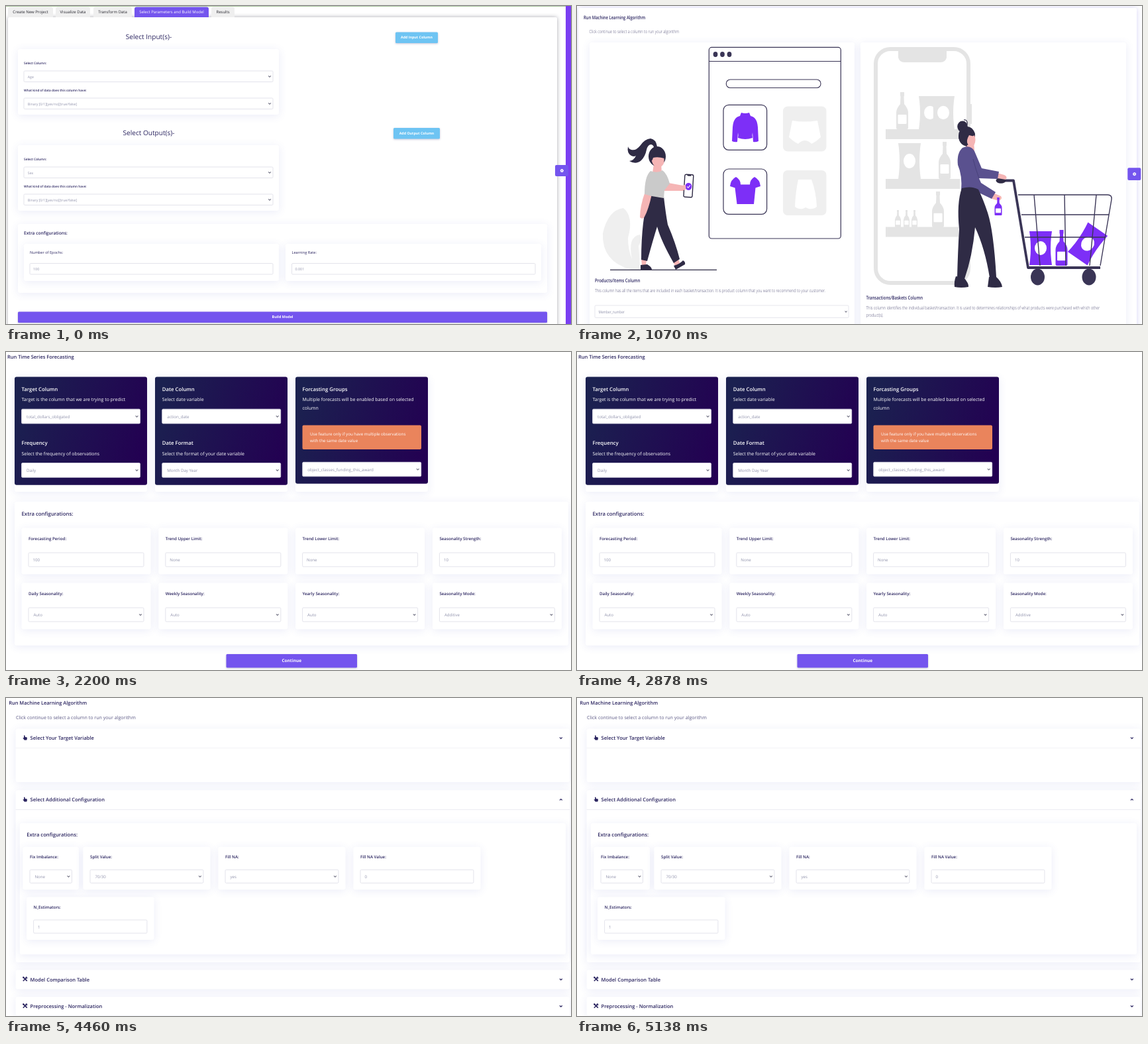
These frames come from a looping animation (853x480 px, 5.59 s). An HTML page with a canvas:

```html
<!DOCTYPE html>
<html lang="en">
<head>
<meta charset="utf-8">
<title>Model builder screens</title>
<style>
html, body { margin: 0; width: 100%; height: 100%; overflow: hidden; background: #fff; }
canvas { display: block; width: 853px; height: 480px; }
</style>
</head>
<body>
<canvas id="stage"></canvas>
<script>
const W = 853, H = 480;
const canvas = document.getElementById('stage');
const ctx = canvas.getContext('2d');
const ratio = window.devicePixelRatio || 1;
canvas.width = Math.round(W * ratio);
canvas.height = Math.round(H * ratio);

const PURPLE = '#7455ee', NAVY = '#2b2560', INK = '#2f2b45', LINE = '#3a3556';
const VIOLET = '#7d2ff7', SKIN = '#f5b5b5', PALE = '#e4e4e4', FIELD = '#9092ab';

function box(x, y, w, h, r, fill, stroke, lw = 1) {
  ctx.beginPath();
  ctx.roundRect(x, y, w, h, r);
  if (fill) { ctx.fillStyle = fill; ctx.fill(); }
  if (stroke) { ctx.strokeStyle = stroke; ctx.lineWidth = lw; ctx.stroke(); }
}

function shadow(color, blur, dy, draw) {
  ctx.save();
  ctx.shadowColor = color;
  ctx.shadowBlur = blur * ratio;
  ctx.shadowOffsetY = dy * ratio;
  draw();
  ctx.restore();
}

function card(x, y, x2, y2) {
  shadow('rgba(70,80,190,.11)', 13, 2, () => box(x, y, x2 - x, y2 - y, 3, '#fff'));
}

// y is the middle of the capital letters
function text(s, x, y, size, { weight = 400, color = NAVY, align = 'left' } = {}) {
  ctx.font = `${weight} ${size}px "Open Sans", "Noto Sans", sans-serif`;
  ctx.fillStyle = color;
  ctx.textAlign = align;
  ctx.fillText(s, x, y + size * 0.357);
}

const bold = (s, x, y, size, color = NAVY) => text(s, x, y, size, { weight: 600, color });

function chevron(x, y, dir = 1, size = 1.9, color = NAVY) {
  ctx.beginPath();
  ctx.moveTo(x - size, y - dir * size / 2);
  ctx.lineTo(x, y + dir * size / 2);
  ctx.lineTo(x + size, y - dir * size / 2);
  ctx.strokeStyle = color;
  ctx.lineWidth = 1.2;
  ctx.stroke();
}

function input(x, y, x2, y2, value, size = 6.1, pad = 6.5) {
  box(x, y, x2 - x, y2 - y, 1.5, '#fff', '#dcdce6', 0.8);
  text(value, x + pad, (y + y2) / 2 + 0.4, size, { color: FIELD });
}

function select(x, y, x2, y2, value, size, pad = 7.5) {
  input(x, y, x2, y2, value, size, pad);
  chevron(x2 - 5, (y + y2) / 2, 1, 1.9, '#777788');
}

function button(x, y, x2, y2, label, color, size) {
  shadow('rgba(60,60,120,.3)', 3, 1, () => box(x, y, x2 - x, y2 - y, 1.5, color));
  text(label, (x + x2) / 2, (y + y2) / 2 - 0.2, size, { weight: 700, color: '#fff', align: 'center' });
}

function shape(d, fill) {
  ctx.fillStyle = fill;
  ctx.fill(new Path2D(d));
}

function stroke(d, color, lw) {
  ctx.strokeStyle = color;
  ctx.lineWidth = lw;
  ctx.stroke(new Path2D(d));
}

function oval(x, y, rx, ry, fill) {
  ctx.beginPath();
  ctx.ellipse(x, y, rx, ry, 0, 0, Math.PI * 2);
  ctx.fillStyle = fill;
  ctx.fill();
}

function gearButton(x, y, h) {
  box(x, y, 20, h, 2, PURPLE);
  const cx = x + 10.3, cy = y + h / 2;
  for (let i = 0; i < 8; i++) {
    const a = i * Math.PI / 4;
    oval(cx + 2 * Math.cos(a), cy + 2 * Math.sin(a), 0.7, 0.7, '#fff');
  }
  oval(cx, cy, 2, 2, '#fff');
  oval(cx, cy, 0.8, 0.8, PURPLE);
}

function columnForm(y, value) {
  card(18, y, 412, y + 99);
  bold('Select Column:', 27, y + 21.5, 4.8);
  select(27, y + 33, 403, y + 49.5, value, 5.2, 5.8);
  bold('What kind of data does this column have:', 27, y + 62, 4.75);
  select(27, y + 74, 403, y + 90.5, 'Binary [0/1][yes/no][true/false]', 5.2, 5.8);
}

function parameters() {
  shadow('rgba(40,40,60,.4)', 6, 0, () => box(3, 17, 829, 480, 2, '#fff'));
  box(0, 0, W, 1, 0, '#a9c59c');
  const tabs = [
    [3, 71, 'Create New Project'], [75, 127, 'Visualize Data'], [132, 190, 'Transform Data'],
    [194, 306, 'Select Parameters and Build Model'], [310, 345, 'Results']
  ];
  tabs.forEach(([x, x2, label], i) => {
    const on = i === 3;
    box(x, 1.5, x2 - x, 15.5, [3, 3, 0, 0], on ? PURPLE : '#efefef');
    text(label, (x + x2) / 2, 9.3, 6, { color: on ? '#fff' : '#25252d', align: 'center' });
  });
  box(845, 0, 8, H, 0, '#7a3ff2');

  const title = { weight: 500, align: 'center' };
  text('Select Input(s)-', 215.5, 46, 10.1, title);
  text('Select Output(s)-', 215.5, 191, 10.1, title);
  button(588, 39.5, 652, 56, 'Add Input Column', '#6ec4f3', 5.3);
  button(585, 184, 655, 200.5, 'Add Output Column', '#6ec4f3', 5.3);
  columnForm(65, 'Age');
  columnForm(210, 'Sex');

  card(18, 329, 817, 433);
  bold('Extra configurations:', 27, 342.5, 6.6);
  card(27, 359, 412, 415);
  card(422, 359, 808, 415);
  text('Number of Epochs:', 36, 372.5, 5.6, { weight: 500 });
  text('Learning Rate:', 431.5, 372.5, 5.6, { weight: 500 });
  input(36, 388.5, 403, 405, '100', 5.4, 5);
  input(431.5, 388.5, 799, 405, '0.001', 5.4, 5);
  button(18, 461.5, 817, 478, 'Build Model', PURPLE, 5.4);
  gearButton(829, 240, 17);
}

function bottle(x, y, w, h, fill) {
  ctx.save();
  ctx.translate(x, y);
  ctx.scale(w / 18, h / 56);
  shape('M6 0H12V5L11.5 7L12 18Q18 25 18 31V54Q18 56 16 56H2Q0 56 0 54V31Q0 25 6 18L6.5 7L6 5Z', fill);
  box(2.5, 34, 13, 14, 1, '#fff');
  ctx.restore();
}

function bag(x, y, w, h, fill) {
  ctx.save();
  ctx.translate(x, y);
  ctx.scale(w / 34, h / 54);
  shape('M0 0H34L33 8Q31 27 33 46L34 54H0L1 46Q3 27 1 8Z', fill);
  oval(17, 27, 9, 11, '#fff');
  ctx.restore();
}

function browserWindow() {
  box(199.3, 62.4, 199, 288.6, 4, '#fff', LINE, 1.2);
  stroke('M199 83.5H398', LINE, 1.1);
  [209, 219.5, 230].forEach(x => oval(x, 73, 3.4, 4, LINE));
  box(225.3, 111, 142.7, 12.5, 6, null, LINE, 1.1);
  box(221, 149.3, 65.6, 68, 8, null, LINE, 1.2);
  box(221, 246, 65.6, 68.3, 8, null, LINE, 1.2);
  box(311, 151.5, 65.5, 68, 7, '#efefef');
  box(311, 248, 65.5, 68, 7, '#efefef');
  shape('M248 161Q254 163 260 161L262 166Q272 168 273 183L274 204Q270 206 266 205L265 191Q264 195 265 199Q254 203 243 199Q244 195 243 191L242 205Q238 206 234 204L235 183Q236 168 246 166Z', VIOLET);
  shape('M240 258Q247 262 247 269.5H261Q261 262 268 258Q276 262 277 272L269.5 274.5L267 299H241.500L238.500 274.500L231 272Q232 262 240 258Z', VIOLET);
  shape('M325 173Q344 176 363 173L368 198Q361 205 354 208Q349 203 344 203Q339 203 334 208Q327 205 320 198Z', '#fff');
  shape('M334 262H354Q361 280 362 303Q357 307 350 306L345 304L341 306Q334 307 329 303Q330 280 334 262Z', '#fff');
}

function shopper() {
  shape('M82 398Q37 386 39 343Q47 308 70 305Q86 318 77 350Q77 368 83 382Q76 348 95 345Q99 352 93 362Q94 373 95 398Z', '#efefef');
  stroke('M50 398.3H211', INK, 1.2);
  shape('M121 212Q119 201 111 200Q102 201 96 210Q89 219 82 217Q78 216 77 212Q75 222 82 226Q86 228 89 226Q86 233 79 234Q89 240 97 233Q103 227 105 217Q107 209 112 209Q116 210 116 214Z', INK);
  shape('M116 238H127L128 252H114Z', SKIN);
  oval(121, 227, 13, 15, INK);
  shape('M112 228H131Q134 242 122 244Q113 242 112 228Z', SKIN);
  shape('M110 233Q107 214 121 213Q135 215 132 230Q122 227 115 229Q113 236 110 233Z', INK);
  shape('M132 266L160 271L169 267L171 270L163 279L132 279Z', SKIN);
  shape('M97 380H105L104 393H98ZM145 386L153 382L156 390L149 394Z', SKIN);
  shape('M109 283Q121 290 131 288Q134 314 137 330Q149 358 155 382L146 388Q127 355 121 333Q115 352 106 385L97 383Q97 322 109 283Z', INK);
  shape('M103 280L113 284Q108 307 102 318Q99 323 95 319Q95 302 103 280Z', SKIN);
  shape('M111 249Q122 253 129 248Q136 253 140 268L132 278L131 290L113 287L102 284Q102 257 111 249Z', '#cacaca');
  shape('M96 391L106 390Q113 394 113 398H96ZM146 392Q156 389 160 384Q164 386 163 390L149 398Z', INK);
  ctx.save();
  ctx.translate(168.4, 271.5);
  ctx.rotate(0.06);
  box(-6.5, -17, 13, 34, 2, '#fff', INK, 1.4);
  box(-3, -17, 6, 2, 1, INK);
  oval(0, 1, 5, 5.6, VIOLET);
  stroke('M-2 1L-.5 3L2.5 -1', '#fff', 1);
  ctx.restore();
  oval(162, 274, 2.4, 4, SKIN);
}

function bigPhone() {
  box(451, 65, 140, 353, 22, '#fff', PALE, 6);
  shape('M485 65H558V78Q556 85 549 85H494Q487 85 485 78Z', PALE);
  box(594, 148, 2, 30, 0, PALE);
  [[186, 112], [261, 112], [333.5, 110]].forEach(([y, w]) => box(466, y, w, 15, 0, PALE));
  bottle(482, 130, 18, 56, PALE);
  bag(516, 136, 34, 50, PALE);
  bag(536, 136, 34, 50, PALE);
  bag(485, 207, 34, 54, PALE);
  bottle(546, 205, 18, 56, PALE);
  [480, 493, 505].forEach(x => bottle(x, 308, 9, 26, PALE));
  bottle(536, 280, 18, 54, PALE);
}

function cart() {
  bag(683, 340, 34, 51, VIOLET);
  bottle(722.5, 338, 18, 54, VIOLET);
  ctx.save();
  ctx.translate(771, 359);
  ctx.rotate(0.6);
  bag(-18, -27, 36, 54, VIOLET);
  ctx.restore();
  stroke('M666 285H801Q808 285 807 292L790 392M690 285L699 392M736 285L738 392M784 285L774 392M671 315H803M676 349H797', LINE, 1.4);
  ctx.lineJoin = 'round';
  stroke('M640 263.5H659L681 395H790', LINE, 3.8);
  ctx.lineJoin = 'miter';
  oval(640, 263.5, 7.5, 4.2, INK);
  stroke('M695 395V407M773 395V407', LINE, 3);
  oval(695.5, 409, 10.5, 12.5, LINE);
  oval(773, 409, 10.5, 12.5, LINE);
}

function cartShopper() {
  shape('M634 252L645 255Q651 258 647 262L635 260ZM628 282L640 287Q643 291 637 294L626 291Z', SKIN);
  shape('M588 204H599L600 219H586Z', SKIN);
  oval(582, 182, 7.8, 8.5, INK);
  stroke('M584 172Q590 171 589 179', INK, 1.2);
  oval(588.5, 196, 12.5, 14, INK);
  oval(595, 202, 6.5, 10.5, SKIN);
  shape('M585 187Q594 179 601 193Q600 198 592 195Q587 203 589 212Q577 210 576 197Z', INK);
  shape('M582 214Q594 209 600 219Q606 233 611 245L637 250L635 261L607 260L610 267L632 281L626 291L605 281Q594 278 580 279Q582 256 575 240Q573 222 582 214Z', '#5a518f');
  stroke('M598 231Q602 247 607 260', '#453e75', 0.8);
  shape('M581 275Q596 271 606 277Q613 291 620 312Q629 340 633 409L623 410Q616 366 601 334Q597 378 585 412L574 410Q575 370 577 337Q573 297 581 275Z', INK);
  shape('M572 408L584 410Q592 419 591 424Q580 426 570 424Q569 416 572 408ZM622 409L632 408Q641 416 642 424Q632 426 620 424Z', INK);
  bottle(630.5, 289, 11, 27, VIOLET);
}

function basket() {
  shadow('rgba(90,80,220,.25)', 8, 0, () => box(2, 3, 843, 490, 2, '#fff'));
  card(19, 55, 419, 520);
  card(428, 55, 829, 520);
  browserWindow();
  shopper();
  bigPhone();
  cart();
  cartShopper();

  // this screen is narrower than the others
  const k = 0.79, light = { weight: 300, color: '#4a4770' };
  ctx.save();
  ctx.scale(k, 1);
  bold('Run Machine Learning Algorithm', 10 / k, 17, 7.45);
  text('Click continue to select a column to run your algorithm', 18.5 / k, 39, 7, light);
  bold('Products/Items Column', 27 / k, 414, 7.6);
  text('This column has all the items that are included in each basket/transaction. It is product column that you want to recommend to your customer.', 27 / k, 429.5, 6.92, light);
  bold('Transactions/Baskets Column', 436.5 / k, 440.5, 7.6);
  text('This column identifies the individual basket/transaction. It is used to determines relationships of what products were purchased with which other', 436.5 / k, 455.5, 6.92, light);
  text('product(s).', 436.5 / k, 466.5, 6.92, light);
  select(27 / k, 452, 410 / k, 470.5, 'Member_number', 6.1, 7);
  ctx.restore();
  gearButton(831.3, 244.3, 18.7);
}

function darkCard(x, h) {
  card(x, 37.4, x + 200, 211);
  const g = ctx.createLinearGradient(x, 90, x + 200, 150);
  g.addColorStop(0, '#1b2150');
  g.addColorStop(1, '#230052');
  box(x, 37.4, 200, h, 3, g);
}

function darkField(x, y, title, note, value) {
  bold(title, x, y, 7.8, '#fff');
  text(note, x, y + 16, 6.95, { color: '#fff' });
  select(x, y + 30.2, x + 179, y + 52, value, 6.2);
}

function forecasting() {
  bold('Run Time Series Forecasting', 2, 7.7, 7.45);
  darkCard(13, 163.4);
  darkCard(225, 163.4);
  darkCard(437, 161.4);
  darkField(23.5, 56, 'Target Column', 'Target is the column that we are trying to predict', 'total_dollars_obligated');
  darkField(23.5, 137.3, 'Frequency', 'Select the frequency of observations', 'Daily');
  darkField(235.7, 56, 'Date Column', 'Select date variable', 'action_date');
  darkField(235.7, 137.3, 'Date Format', 'Select the format of your date variable', 'Month Day Year');
  const white = { color: '#fff' };
  bold('Forcasting Groups', 447.5, 56, 7.8, '#fff');
  text('Multiple forecasts will be enabled based on selected', 447.5, 72, 6.95, white);
  text('column', 447.5, 85, 6.95, white);
  box(447.5, 110.5, 179.5, 36.5, 2, '#ea845c');
  text('Use feature only if you have multiple observations', 459, 124, 6.2, white);
  text('with the same date value', 459, 134, 6.2, white);
  select(447.7, 166.3, 626.7, 187.8, 'object_classes_funding_this_award', 6.2);

  card(13, 226, 849, 443);
  bold('Extra configurations:', 23.5, 244, 7.8);
  const fields = [
    ['Forecasting Period:', '100'], ['Trend Upper Limit:', 'None'],
    ['Trend Lower Limit:', 'None'], ['Seasonality Strength:', '10'],
    ['Daily Seasonality:', 'Auto'], ['Weekly Seasonality:', 'Auto'],
    ['Yearly Seasonality:', 'Auto'], ['Seasonality Mode:', 'Additive']
  ];
  fields.forEach(([label, value], i) => {
    const x = 23.5 + (i % 4) * 206.8, y = i < 4 ? 265.5 : 348.5;
    card(x, y, x + 195, y + 70);
    bold(label, x + 10.5, y + 16.5, 6.2);
    (i < 4 ? input : select)(x + 10.5, y + 37.5, x + 184.5, y + 58.5, value);
  });
  button(332.5, 456, 530, 476.5, 'Continue', PURPLE, 6.5);
}

function icon(kind, x, y) {
  ctx.save();
  ctx.translate(x, y);
  if (kind === 'hand') {
    box(-1.8, -3.6, 1.6, 5, 0.8, NAVY);
    shape('M-3 -.2L-1.8 .4V-1H0L3 -.4V2L2.4 3.6H-1.2L-3.2 .6Z', NAVY);
  } else {
    stroke('M-2.6 -2.6L3 3', NAVY, 1.7);
    stroke('M2.2 -2.2L-3 3', NAVY, 1.5);
    oval(-2.5, -2.5, 1.2, 1.2, NAVY);
    oval(2.2, -2.2, 1.6, 1.6, NAVY);
    shape('M2.2 -2.2L4 -4.2L4.2 -2.2Z', '#fff');
  }
  ctx.restore();
}

function panel(x, x2, y, y2, kind, title, up) {
  card(x, y, x2, y2);
  const cy = y + 14.5;
  icon(kind, x + 14.2, cy - 0.8);
  bold(title, x + 22, cy, 7.5);
  chevron(x2 - 13.2, cy - 0.3, up ? -1 : 1);
  if (kind === 'hand') box(x, y + 29, x2 - x, 0.7, 0, '#e6e6ee');
}

function field(x, x2, y, label, value, kind, pad = 10.6) {
  card(x, y, x2, y + 64.5);
  bold(label, x + pad, y + 15, 6.2);
  kind(x + pad, y + 34.5, x2 - pad, y + 54.5, value);
}

function configHead(dx, x2, panelEnd, innerEnd) {
  const x = 12.4 + dx;
  bold('Run Machine Learning Algorithm', 2 + dx, 7 + dx * 0.3, 7.45);
  text('Click continue to select a column to run your algorithm', x + 0.3, 29.3 + dx * 0.3, 7.1, { color: '#5d5a86' });
  panel(x, x2, 45.5 + dx * 0.3, 127, 'hand', 'Select Your Target Variable');
  panel(x, x2, 139.3, panelEnd, 'hand', 'Select Additional Configuration', true);
  card(18.5 + dx, 189, 845, innerEnd);
  bold('Extra configurations:', 29 + dx, 206, 7.7);
}

function configuration() {
  configHead(0, 850, 324, 313);
  field(29, 222, 225, 'Fix Imbalance:', 'None', select);
  field(233, 426, 225, 'Split Value:', '70/30', select);
  field(437, 630, 225, 'Fill NA:', 'yes', select);
  field(641.5, 834.5, 225, 'Fill NA Value:', '0', input);
  panel(12.4, 850, 335.5, 364, 'tools', 'Model Comparison Table');
  panel(12.4, 850, 376, 405, 'tools', 'Preprocessing - Normalization');
  panel(12.4, 850, 416.8, 445.5, 'tools', 'Preprocessing - Encode non-numeric columns');
  button(332.5, 457.5, 530.5, 476.5, 'Continue', PURPLE, 6.5);
}

function estimators() {
  configHead(2.2, 851, 399, 387);
  field(25.4, 110, 224.8, 'Fix Imbalance:', 'None', select);
  field(116.4, 308.5, 224.8, 'Split Value:', '70/30', select);
  field(320.4, 512.5, 224.8, 'Fill NA:', 'yes', select);
  field(524.4, 716.5, 224.8, 'Fill NA Value:', '0', input);
  field(31, 223.5, 300.5, 'N_Estimators:', '1', input);
  panel(14.6, 851, 410.5, 439.5, 'tools', 'Model Comparison Table');
  panel(14.6, 851, 451, 479, 'tools', 'Preprocessing - Normalization');
}

const scenes = [[1070, parameters], [2200, basket], [3330, forecasting], [4460, configuration], [5590, estimators]];
const LOOP = 5590;
let start = null, shown = null;

function frame(now) {
  if (start === null) start = now;
  const t = (now - start) % LOOP;
  const draw = scenes.find(([end]) => t < end)[1];
  if (draw !== shown) {
    shown = draw;
    ctx.setTransform(ratio, 0, 0, ratio, 0, 0);
    ctx.textRendering = 'geometricPrecision';
    box(0, 0, W, H, 0, '#fff');
    draw();
  }
  requestAnimationFrame(frame);
}
requestAnimationFrame(frame);
</script>
</body>
</html>
```
